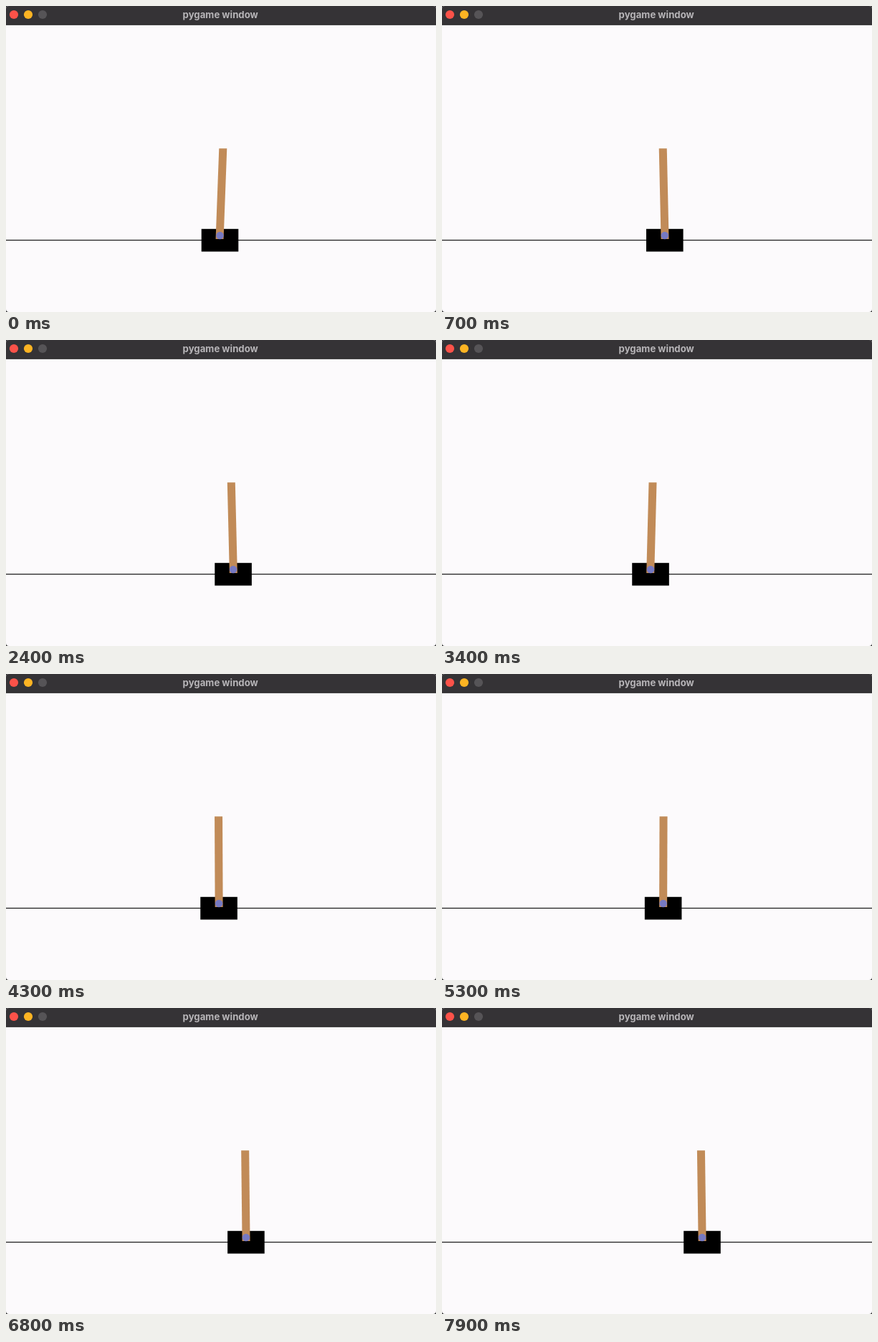
Write an HTML page that moves like this. It is 600x428 px and loops after 8 s.

```html
<!DOCTYPE html>
<html lang="en">
<head>
<meta charset="utf-8">
<title>Cart and pole</title>
<style>
  html, body { margin: 0; width: 100%; height: 100%; overflow: hidden; background: #2b2a2c; }
  svg { display: block; width: 600px; height: 428px; border-radius: 4px; background: #fcfafc; }
  text { font: 700 13.2px Inter, "Open Sans", sans-serif; fill: #b7b5b8; text-anchor: middle; }
</style>
</head>
<body>
<svg viewBox="0 0 600 428">
  <rect width="600" height="26.6" fill="#353336"/>
  <rect y="25.6" width="600" height="1" fill="#29282a"/>
  <circle cx="11" cy="12" r="6.1" fill="#fc5249"/>
  <circle cx="31" cy="12" r="6.1" fill="#fdb423"/>
  <circle cx="51" cy="12" r="6.1" fill="#565457"/>
  <text x="299.2" y="16.5">pygame window</text>
  <rect y="326.9" width="600" height="1.3" fill="#222"/>
  <g id="cart">
    <rect x="-25.8" y="311.8" width="51.6" height="31.7"/>
    <path id="pole" fill="#c18b58"/>
    <circle cy="321" r="5.2" fill="#7679c2"/>
  </g>
</svg>
<script>
const LOOP = 8000, STEP = 100;
const cart = document.getElementById('cart');
const pole = document.getElementById('pole');

// Where the cart turns or slows: [time in ms, x]
const turns = [
  [0, 298.5], [1000, 314], [1300, 312], [2050, 320.5], [3700, 288.5], [4800, 303.5],
  [5900, 315.5], [6200, 313.5], [7300, 351], [8300, 369.3]
];

// Cosine easing from one turn to the next
function cartX(t) {
  const i = Math.max(1, turns.findIndex(([end]) => t <= end));
  const [t0, x0] = turns[i - 1], [t1, x1] = turns[i];
  return x0 + (x1 - x0) * (1 - Math.cos(Math.PI * (t - t0) / (t1 - t0))) / 2;
}

// The pole leans the way the cart accelerates
function poleLean(t, span = 400) {
  return 0.4 * (cartX(t - span) + cartX(t + span) - 2 * cartX(t));
}

function draw(now) {
  const t = Math.floor(now % LOOP / STEP) * STEP;
  const tip = poleLean(t), foot = -tip / 10;
  cart.setAttribute('transform', `translate(${cartX(t)} 0)`);
  pole.setAttribute('d', `M${tip - 5.5} 199.3h11L${foot + 5.5} 326h-11z`);
  requestAnimationFrame(draw);
}
draw(0);
</script>
</body>
</html>
```
